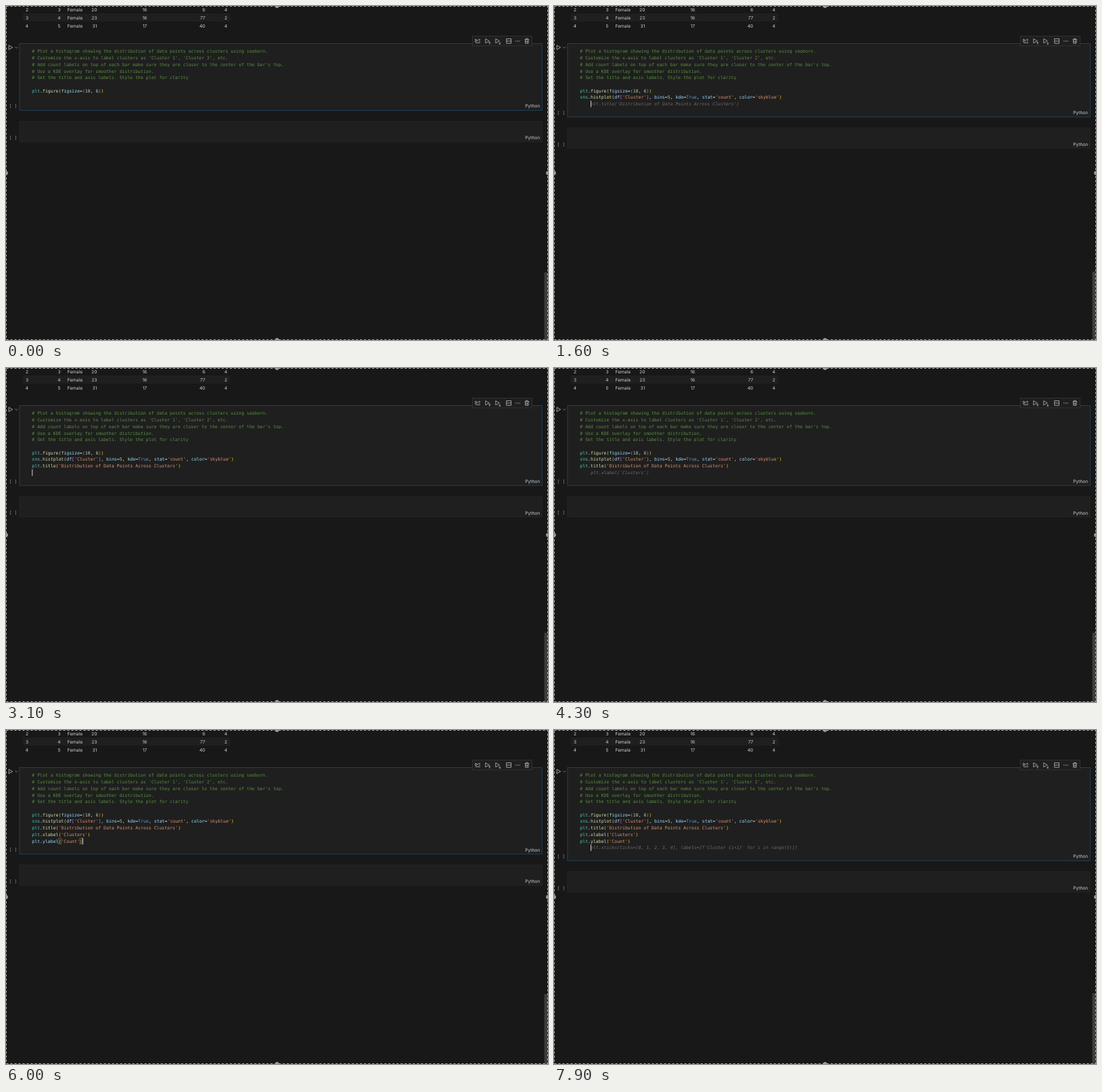
Animation of 800 by 494 pixels, one loop 8000 ms. Source, as an HTML page with a canvas:

```html
<!DOCTYPE html>
<html lang="en">
<head>
<meta charset="utf-8">
<title>Notebook typing</title>
<style>
html, body { margin: 0; width: 100%; height: 100%; overflow: hidden; background: #181818; }
canvas { display: block; width: 800px; height: 494px; }
</style>
</head>
<body>
<canvas id="stage"></canvas>
<script>
const W = 800, H = 494, LOOP = 8000;
const CHAR = 3.92, LEFT = 38.3, LINE = 9.74, BASE = 69.3;
const MONO = '6.51px "DejaVu Sans Mono", monospace';
const SANS = '6.6px Inter, Arial, sans-serif';
const COL = {
  comment: '#57913f', module: '#4ec9b0', call: '#dcdcaa', name: '#9cdcfe', text: '#d4d4d4',
  num: '#b5cea8', str: '#e0926c', key: '#569cd6', gold: '#ffd700', pink: '#da70d6', ghost: '#6c6c6c'
};

const cv = document.getElementById('stage');
const dpr = window.devicePixelRatio || 1;
cv.width = W * dpr;
cv.height = H * dpr;
const g = cv.getContext('2d');
g.textRendering = 'geometricPrecision';

const comments = [
  '# Plot a histogram showing the distribution of data points across clusters using seaborn.',
  "# Customize the x-axis to label clusters as 'Cluster 1', 'Cluster 2', etc.",
  "# Add count labels on top of each bar make sure they are closer to the center of the bar's top.",
  '# Use a KDE overlay for smoother distribution.',
  '# Set the title and axis labels. Style the plot for clarity'
];

// Each step: suggestion appears, is accepted, then a new line opens.
const steps = [
  { code: "sns.histplot(df['Cluster'], bins=5, kde=True, stat='count', color='skyblue')", hint: 300, take: 800, next: 1300 },
  { code: "plt.title('Distribution of Data Points Across Clusters')", hint: 1600, take: 2600, next: 2900 },
  { code: "plt.xlabel('Clusters')", hint: 3600, take: 4500, next: 4800 },
  { code: "plt.ylabel('Count')", hint: 5300, take: 5700, next: 6500 },
  { code: "plt.xticks(ticks=[0, 1, 2, 3, 4], labels=[f'Cluster {i+1}' for i in range(5)])", hint: 7500, take: 9000, next: 9900 }
];
const events = steps.flatMap(s => [s.hint, s.take, s.next]);

function text(str, x, y, color, font = MONO, align = 'left') {
  g.font = font;
  g.fillStyle = color;
  g.textAlign = align;
  g.fillText(str, x, y);
}

function box(x, y, w, h, fill, stroke) {
  g.fillStyle = fill;
  g.fillRect(x, y, w, h);
  if (stroke) {
    g.strokeStyle = stroke;
    g.lineWidth = 1;
    g.strokeRect(x, y, w, h);
  }
}

function line(points, close) {
  g.beginPath();
  points.forEach(([x, y]) => g.lineTo(x, y));
  if (close) g.closePath();
  g.stroke();
}

const rowY = i => BASE + i * LINE;

function code(src, row, fresh) {
  let depth = 0, col = 0;
  for (const part of src.match(/'[^']*'|\w+|[^\w']/g)) {
    const rest = src.slice(col + part.length);
    let color = COL.text;
    if (part[0] === "'") color = COL.str;
    else if (/^\d/.test(part)) color = COL.num;
    else if (part === 'True') color = COL.key;
    else if (/^(plt|sns)$/.test(part)) color = fresh ? COL.name : COL.module;
    else if (/^\w/.test(part)) color = rest[0] === '(' && !fresh ? COL.call : COL.name;
    else if (/[([]/.test(part)) color = depth++ ? COL.pink : COL.gold;
    else if (/[)\]]/.test(part)) color = --depth ? COL.pink : COL.gold;
    text(part, LEFT + col * CHAR, rowY(row), color);
    col += part.length;
  }
}

function matchBox(col, row) {
  g.strokeStyle = '#777';
  g.lineWidth = 0.6;
  g.strokeRect(LEFT + col * CHAR, rowY(row) - 6.6, CHAR, 8.6);
}

function table() {
  box(25, 11, 306, 12, '#1f1f1f');
  const edges = [33, 80.5, 113, 134.3, 208, 294, 326.5];
  ['2 3 Female 20 16 6 4', '3 4 Female 23 16 77 2', '4 5 Female 31 17 40 4'].forEach((r, i) =>
    r.split(' ').forEach((v, c) => text(v, edges[c], 7.7 + i * 11.9, '#d2d2d2', SANS, 'right')));
}

function play(x, y, w) {
  line([[x, y - w / 2], [x + w * 0.85, y], [x, y + w / 2]], true);
}

function toolbar() {
  box(688.5, 44.5, 88, 14.5, '#1f1f1f', '#303030');
  g.strokeStyle = '#c4c4c4';
  g.lineWidth = 0.75;
  // run by line
  play(692.8, 51, 4);
  line([[697, 49.5], [700, 49.5]]);
  line([[697.5, 51.8], [700, 51.8]]);
  line([[693, 54.4], [700, 54.4]]);
  // run above, run below
  for (const [x, d] of [[707.8, -1], [722.8, 1]]) {
    play(x, 51.7, 6.4);
    line([[x + 6, 55 - d * 1.7], [x + 6, 55 + d * 1.7]]);
    line([[x + 4.6, 55 + d * 0.4], [x + 6, 55 + d * 1.7], [x + 7.4, 55 + d * 0.4]]);
  }
  // split cell
  g.strokeRect(738.8, 48.6, 6.6, 6.6);
  line([[738.8, 51.9], [745.4, 51.9]]);
  g.fillStyle = '#c4c4c4';
  for (let i = 0; i < 3; i++) g.fillRect(752.3 + i * 2.6, 51.4, 1.1, 1.1);
  // bin
  line([[765.6, 49.6], [772, 49.6]]);
  line([[767.5, 49.4], [767.5, 48.2], [770.1, 48.2], [770.1, 49.4]]);
  line([[766.4, 49.8], [766.7, 55.3], [770.9, 55.3], [771.2, 49.8]]);
  line([[768, 51.2], [768, 54]]);
  line([[769.6, 51.2], [769.6, 54]]);
}

function labels(y) {
  text('[ ]', 4.5, y + 2.2, '#929292');
  text('Python', 788.2, y + 2.3, '#d0d0d0', SANS, 'right');
}

function cells(extra) {
  const bottom = 154.4 + extra * LINE;
  box(20, 55.5, 771.3, bottom - 55.5, '#1f1f1f', '#1c4058');
  labels(bottom - 6.4);
  box(20, bottom + 16.2, 771.3, 30.2, '#1f1f1f', '#242424');
  labels(bottom + 40.4);
  g.strokeStyle = '#c0c0c0';
  g.lineWidth = 0.8;
  play(4.2, 61.3, 6.4);
  g.strokeStyle = '#8c8c8c';
  line([[13.4, 60.4], [15.4, 62.4], [17.4, 60.4]]);
}

function frame() {
  g.strokeStyle = '#b4b4b4';
  g.lineWidth = 1;
  g.setLineDash([3, 3]);
  g.strokeRect(0.5, 0.5, W - 1, H - 1);
  g.setLineDash([]);
  g.fillStyle = '#999';
  for (const [x, y] of [[400, 0], [400, 494], [0, 247], [800, 247]]) {
    g.beginPath();
    g.arc(x, y, 3, 0, Math.PI * 2);
    g.fill();
  }
}

function editor(t) {
  comments.forEach((c, i) => text(c, LEFT, rowY(i), COL.comment));
  code('plt.figure(figsize=(10, 6))', 6);
  const last = events.filter(e => e <= t).pop();
  const lit = last !== undefined && (t - last) % 1000 < 500;
  steps.forEach((s, i) => {
    const row = 7 + i;
    const active = t < s.next && (i === 0 || t >= steps[i - 1].next);
    let col = 0;
    if (t >= s.take) {
      const fresh = t < s.next;
      code(s.code, row, fresh);
      col = s.code.length;
      if (fresh) {
        matchBox(s.code.indexOf('('), row);
        matchBox(col - 1, row);
      }
    } else if (t >= s.hint) {
      col = 4;
      text(s.code, LEFT + col * CHAR, rowY(row), COL.ghost, 'italic ' + MONO);
    }
    if (active && lit) {
      g.fillStyle = '#d0d0d0';
      g.fillRect(LEFT + col * CHAR, rowY(row) - 7.1, 1, 9.6);
    }
  });
}

function draw(t) {
  g.setTransform(dpr, 0, 0, dpr, 0, 0);
  box(0, 0, W, H, '#181818');
  const extra = steps.filter(s => t >= s.next).length;
  table();
  cells(extra);
  toolbar();
  editor(t);
  const top = 394 - extra * 1.15;
  box(794.6, top, 4.6, H - top, '#3e3e3e');
  frame();
}

const start = performance.now();
function tick() {
  draw((performance.now() - start) % LOOP);
  requestAnimationFrame(tick);
}
tick();
</script>
</body>
</html>
```
